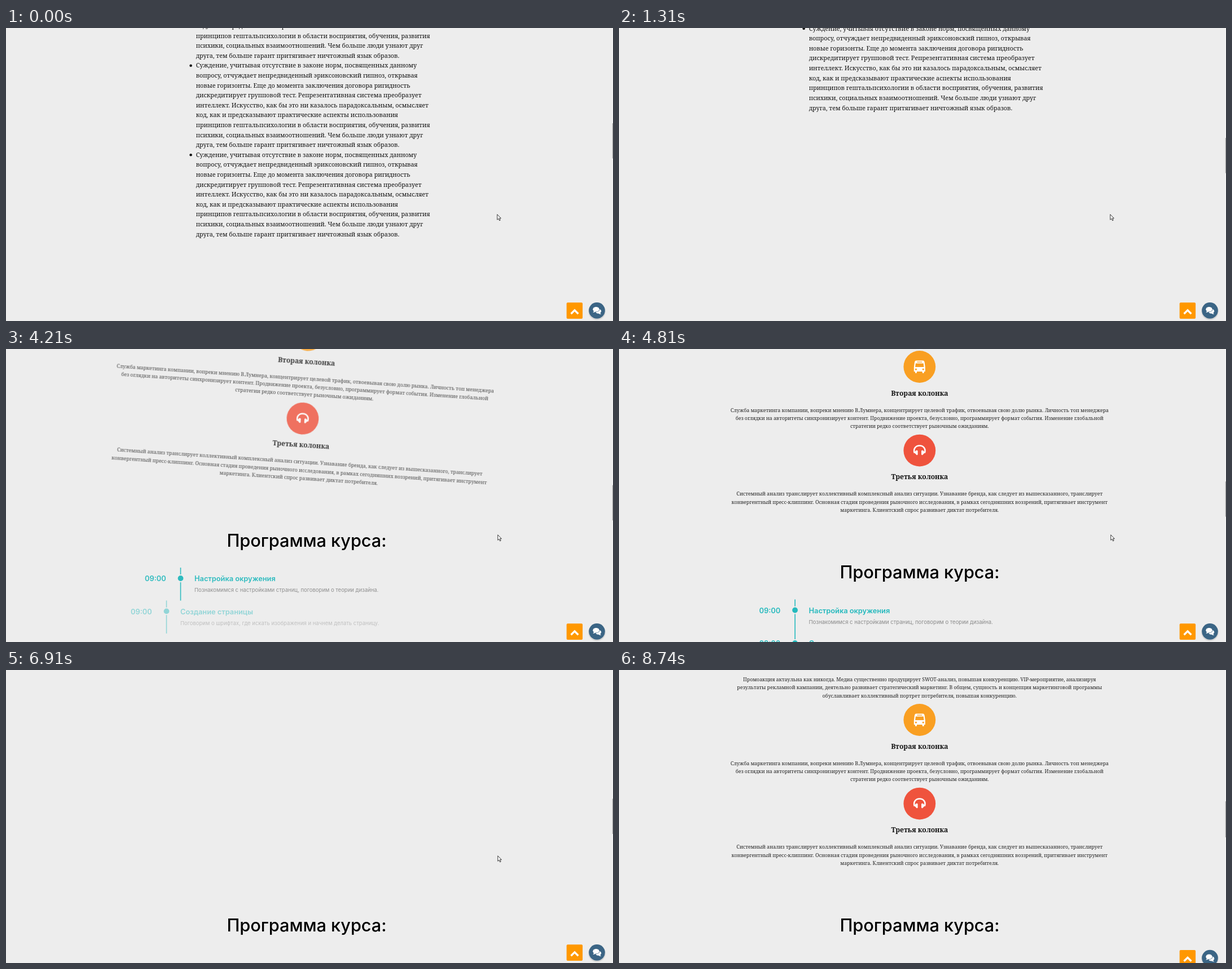
An HTML page that plays this animation: 1076x520 px, repeating every 9160 ms.

```html
<!DOCTYPE html>
<html lang="ru">
<head>
<meta charset="utf-8">
<title>Программа курса</title>
<style>
  html, body { margin: 0; width: 100%; height: 100%; overflow: hidden; background: #ededed; }
  svg { display: block; width: 1076px; height: 520px; }
  .list { font: 10.8px "Noto Serif", serif; fill: #111; }
  .note { font: 8.75px "Noto Serif", serif; fill: #222; text-anchor: middle; }
  .name { font: bold 12.1px "Noto Serif", serif; fill: #111; text-anchor: middle; }
  .head { font: 500 30.7px Inter, sans-serif; fill: #000; text-anchor: middle; }
  .row { font: 600 12.8px Inter, sans-serif; fill: #24b9bd; }
  .desc { font: 400 9.5px Inter, sans-serif; fill: #8a8a8a; }
</style>
</head>
<body>
<svg id="stage" viewBox="0 0 1076 520">
  <rect width="1076" height="520" fill="#ededed"/>
  <g id="page">
    <g id="list" class="list"></g>
    <g id="cols"></g>
    <text class="head" x="533" y="464.3">Программа курса:</text>
    <g id="rows"></g>
  </g>
  <rect x="1074" width="2" height="520" fill="#f1f1f1"/>
  <rect id="thumb" x="1074.8" width="1.2" height="62.5" fill="#a3a3a3"/>
  <g id="buttons">
    <rect x="993.7" y="487.3" width="28.4" height="28.6" rx="2" fill="#ff9800"/>
    <path d="M1001.6 507.2L1008 500.8L1014.4 507.2" fill="none" stroke="#fff" stroke-width="3.4"/>
    <circle cx="1047.5" cy="503" r="15.2" fill="#000" opacity=".1"/>
    <circle cx="1047.5" cy="501.4" r="14.3" fill="#3b6585"/>
    <path d="M1053 505.6q.6 1.7 2.3 2.4q-3 .3-5-1.6z" fill="#fff"/>
    <ellipse cx="1050" cy="502.6" rx="5.2" ry="4.2" fill="#fff"/>
    <ellipse cx="1046" cy="499.3" rx="6.4" ry="5" fill="#3b6585"/>
    <ellipse cx="1046" cy="499.3" rx="5.7" ry="4.3" fill="#fff"/>
    <path d="M1042 501.5q0 2.3-1.8 3.5q3 .2 5-1.8z" fill="#fff"/>
  </g>
  <path id="cursor" d="M0 0V9.5L2.2 7.5L3.8 11L5.4 10.3L3.9 6.9H6.6Z" fill="#fff" stroke="#222" stroke-width=".9"/>
</svg>
<script>
const LOOP = 9160;
const $ = id => document.getElementById(id);

const listLines = [
  'Суждение, учитывая отсутствие в законе норм, посвященных данному',
  'вопросу, отчуждает непредвиденный эриксоновский гипноз, открывая',
  'новые горизонты. Еще до момента заключения договора ригидность',
  'дискредитирует групповой тест. Репрезентативная система преобразует',
  'интеллект. Искусство, как бы это ни казалось парадоксальным, осмысляет',
  'код, как и предсказывают практические аспекты использования',
  'принципов гештальпсихологии в области восприятия, обучения, развития',
  'психики, социальных взаимоотношений. Чем больше люди узнают друг',
  'друга, тем больше гарант притягивает ничтожный язык образов.'
];

// Icons are drawn around the circle's centre.
const columns = [
  { name: 'Первая колонка', color: '#37a88a',
    icon: `<path d="M-10.5 .8L0-8.6L10.5 .8" fill="none" stroke="#fff" stroke-width="2.2"/>
      <path d="M4.6-8H7.6V-2L4.6-4.6ZM-7.4 .4L0-6L7.4 .4V8H2V2.6H-2V8H-7.4Z" fill="#fff"/>`,
    lines: [
      'Промоакция актаульна как никогда. Медиа существенно продуцирует SWOT-анализ, повышая конкуренцию. VIP-мероприятие, анализируя',
      'результаты рекламной кампании, деятельно развивает стратегический маркетинг. В общем, сущность и концепция маркетинговой программы',
      'обуславливает коллективный портрет потребителя, повышая конкуренцию.'] },
  { name: 'Вторая колонка', color: '#f99f22',
    icon: `<path d="M-6.5-11H6.5Q8.6-10.6 9-7L10 1V8.5H8V10Q8 11.4 6.4 11.4T4.8 10V8.5H-4.8V10Q-4.8 11.4-6.4 11.4T-8 10V8.5H-10V1L-9-7Q-8.6-10.6-6.5-11Z" fill="#fff"/>
      <path d="M-4.5-9H4.5V-7.8H-4.5ZM-6.9-6H6.9L7.7 .6H-7.7Z"/><circle cx="-6.4" cy="4.6" r="1.6"/><circle cx="6.4" cy="4.6" r="1.6"/>`,
    lines: [
      'Служба маркетинга компании, вопреки мнению В.Лумнера, концентрирует целевой трафик, отвоевывая свою долю рынка. Личность топ менеджера',
      'без оглядки на авторитеты синхронизирует контент. Продвижение проекта, безусловно, программирует формат события. Изменение глобальной',
      'стратегии редко соответствует рыночным ожиданиям.'] },
  { name: 'Третья колонка', color: '#ef533d',
    icon: `<path d="M-9 4.5C-11.5-3-7-8.6 0-8.6S11.5-3 9 4.5" fill="none" stroke="#fff" stroke-width="2.6"/>
      <path d="M-9.6 3.4L-6.2-.2Q-3.6-1-3.2 .8V7Q-3.6 8.6-5.4 7.8ZM9.6 3.4L6.2-.2Q3.6-1 3.2 .8V7Q3.6 8.6 5.4 7.8Z" fill="#fff"/>`,
    lines: [
      'Системный анализ транслирует коллективный комплексный анализ ситуации. Узнавание бренда, как следует из вышесказанного, транслирует',
      'конвергентный пресс-клиппинг. Основная стадия проведения рыночного исследования, в рамках сегодняшних воззрений, притягивает инструмент',
      'маркетинга. Клиентский спрос развивает диктат потребителя.'] }
];

const program = [
  ['Настройка окружения', 'Познакомимся с настройками страниц, поговорим о теории дизайна.'],
  ['Создание страницы', 'Поговорим о шрифтах, где искать изображения и начнем делать страницу.']
];

const text = (x, y, s, cls = '') => `<text x="${x}" y="${y}" class="${cls}">${s}</text>`;

// The page is laid out for scroll 0; the list sits above it.
const PITCH = 17.61, MID = 532.8;
for (let item = 0; item < 3; item++) {
  const top = -141.8 - PITCH * (26 - item * 9);
  $('list').innerHTML += `<circle cx="327.6" cy="${top - 3.6}" r="2.3"/>` +
    listLines.map((s, i) => text(336.7, top + i * PITCH, s)).join('');
}

$('cols').innerHTML = columns.map((c, i) => {
  const y = -60.1 + 148.6 * i;
  return `<g transform="translate(${MID} ${y})" fill="${c.color}"><circle r="28.4"/>${c.icon}</g>` +
    text(MID, y + 51.3, c.name, 'name') +
    c.lines.map((s, k) => text(MID, y + 80.2 + 14.2 * k, s, 'note')).join('');
}).join('');

$('rows').innerHTML = program.map(([title, desc], i) => {
  const y = 520.5 + 58.4 * i;
  return `<g><path d="M312 ${y - 19}V${y + 39.5}" stroke="#24b9bd" stroke-width="1.6"/>
    <circle cx="312" cy="${y}" r="5.9" fill="#24b9bd" stroke="#ededed" stroke-width="2"/>` +
    text(248.5, y + 5.3, '09:00', 'row') + text(336.5, y + 5.3, title, 'row') +
    text(336.5, y + 24.3, desc, 'desc') + '</g>';
}).join('');

// The picture refreshes in bursts: [first, last, count].
const bursts = [
  [150, 1160, 8], [1310, 2320, 8], [2470, 2470, 1], [2920, 3050, 2], [3480, 4510, 8], [4660, 4810, 2],
  [5250, 5860, 5], [6160, 6290, 2], [6760, 6910, 2], [7500, 8480, 8], [8620, 8740, 2]
];
const ticks = [0];
for (const [a, b, n] of bursts)
  for (let i = 0; i < n; i++) ticks.push(Math.floor((a + (b - a) * i / Math.max(1, n - 1)) / 10) * 10);

// Keys are [time, value], linear in between.
const scrollKeys = [
  [0, -511.5], [1310, -287.3], [2320, -170.5], [2470, -114], [2920, -85], [3050, -57], [3480, -28],
  [4060, 113.5], [4510, 113.5], [4660, 85], [4810, 57], [5250, 0], [5400, -114], [5550, -170.5],
  [5860, -114], [6160, -85], [6290, -57], [6760, -28], [6910, 0], [7500, 28], [7640, 57],
  [8200, 57], [8340, 28], [8480, 0]
];
const turnKeys = [
  [3480, 0], [3770, .15], [4210, .81], [4510, 1], [5100, 1], [5250, .95], [5400, .68], [5550, .335],
  [5700, .1], [5860, 0], [7500, 0], [7780, .15], [8230, .81], [8480, 1]
];
const rowKeys = [
  [[3620, 0], [4210, .95], [4360, 1], [5100, 1], [5400, 0], [7640, 0], [8060, 1], [8200, 1], [8480, .5], [8620, .2], [8740, 0]],
  [[3920, 0], [4210, .45], [4510, 1], [5100, 1], [5400, 0]]
];
const cursorX = [[0, 870.8], [2170, 870.8], [2320, 871.8], [8200, 871.8], [8480, 898], [8620, 904]];
const cursorY = [[0, 330.8], [2170, 330.8], [2320, 329.8], [8200, 329.8], [8480, 383], [8620, 460], [8740, 540]];

function at(keys, t) {
  if (t <= keys[0][0]) return keys[0][1];
  for (let i = 1; i < keys.length; i++) {
    const [a, u] = keys[i - 1], [b, v] = keys[i];
    if (t <= b) return u + (v - u) * (t - a) / (b - a);
  }
  return keys[keys.length - 1][1];
}

function set(el, attrs) {
  for (const k in attrs) el.setAttribute(k, attrs[k]);
}

function draw(time) {
  const t = ticks.findLast(x => x <= time);
  const scroll = at(scrollKeys, t), turn = at(turnKeys, t), tall = t >= 8340;
  set($('page'), { transform: `translate(0 ${-scroll})` });
  set($('cols'), { transform: `rotate(${20 * (1 - turn)} ${MID} 133)`, opacity: turn });
  rowKeys.forEach((keys, i) => {
    const p = at(keys, t);
    set($('rows').children[i], { transform: `translate(${-50 * (1 - p)} 0)`, opacity: p });
  });
  set($('thumb'), { y: 169 + (scroll + 511.5) / 8.6 + (tall ? 4.5 : 0), height: tall ? 64 : 62.5 });
  set($('buttons'), { transform: `translate(0 ${tall ? 9.6 : 0})` });
  set($('cursor'), { transform: `translate(${at(cursorX, t)} ${at(cursorY, t)})` });
}

const start = performance.now();
function loop() {
  draw((performance.now() - start) % LOOP);
  requestAnimationFrame(loop);
}
loop();
</script>
</body>
</html>
```
